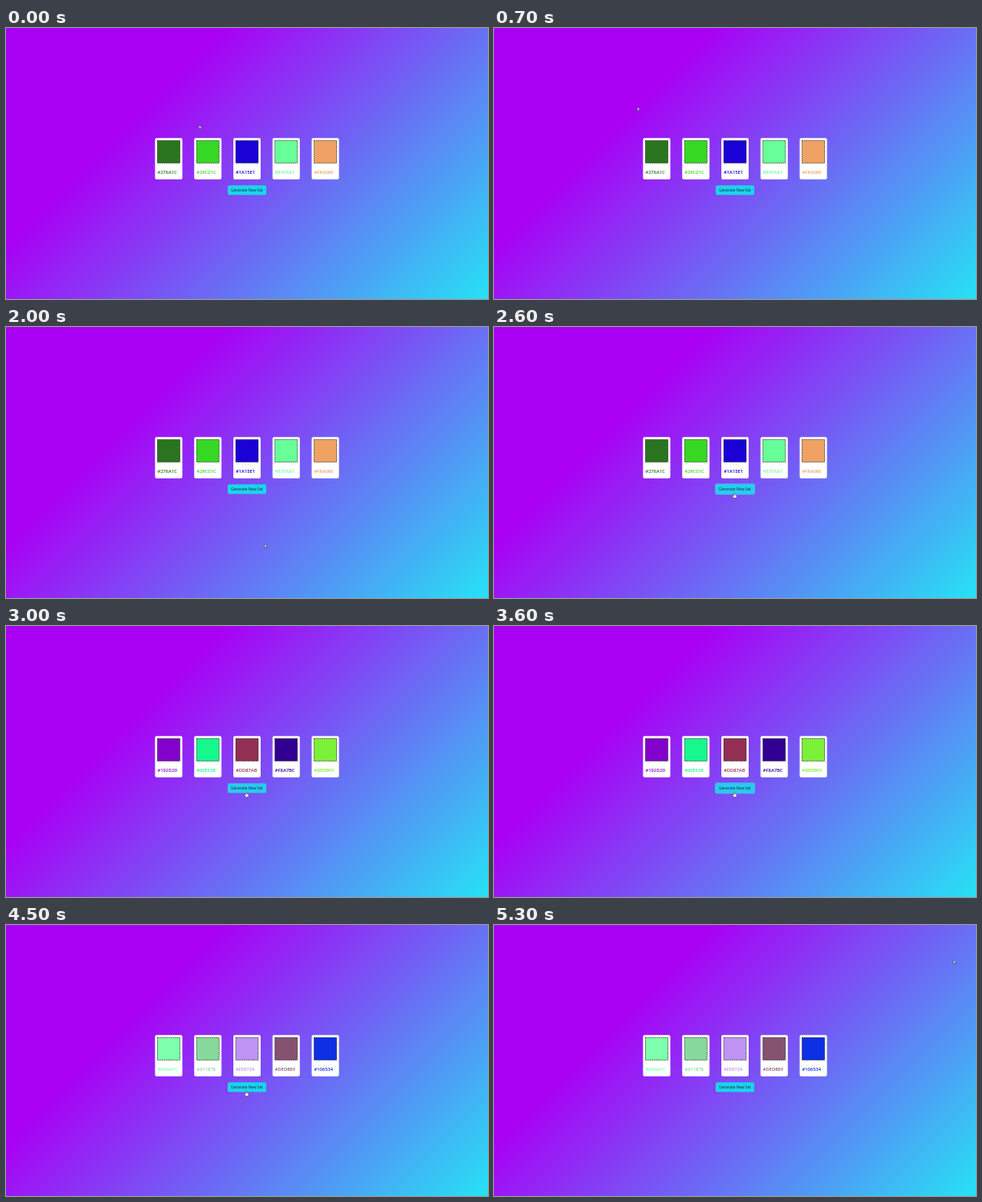
An HTML page that plays this animation: 600 px wide and 338 px high, repeating every 5.4 s.

```html
<!DOCTYPE html>
<html lang="en">
<head>
<meta charset="utf-8">
<title>Colour set generator</title>
<style>
  html, body { margin: 0; width: 100%; height: 100%; overflow: hidden; }
  body { background: linear-gradient(135deg, #a900f4 29%, #28dff4 99%); }
  svg { display: block; width: 600px; height: 338px; font-family: "Open Sans", "Noto Sans", sans-serif; }
  .code { font-size: 5.8px; font-weight: 600; }
  .swatch { stroke: #000; stroke-opacity: .7; stroke-width: .9; stroke-dasharray: 1.6 .8; }
  .label { font-size: 4.75px; fill: #0b2a4a; }

  .set, .ring, .hand, .arrow, .pointer { animation: 5400ms infinite step-end; }
  .set:nth-child(1) { animation-name: first; }
  .set:nth-child(2) { animation-name: second; }
  .set:nth-child(3) { animation-name: third; }
  .ring { animation-name: press; }
  .button { fill: #1dd3ea; animation: hover 5400ms infinite linear; }
  .hand { animation-name: over; }
  .arrow { animation-name: away; }
  .pointer { animation-name: move; animation-timing-function: linear; }

  @keyframes first  { 0% { opacity: 1 } 50%, 100% { opacity: 0 } }
  @keyframes second { 0% { opacity: 0 } 50% { opacity: 1 } 68.5%, 100% { opacity: 0 } }
  @keyframes third  { 0% { opacity: 0 } 68.5%, 100% { opacity: 1 } }
  @keyframes press  { 0% { opacity: 0 } 48.1% { opacity: 1 } 51.8% { opacity: 0 } 64.8% { opacity: 1 } 70.3%, 100% { opacity: 0 } }
  @keyframes over   { 0% { opacity: 0 } 46.2% { opacity: 1 } 85.1%, 100% { opacity: 0 } }
  @keyframes away   { 0% { opacity: 1 } 46.2% { opacity: 0 } 85.1%, 100% { opacity: 1 } }
  @keyframes hover  { 0%, 46.2% { fill: #1dd3ea } 49%, 70% { fill: #2bcaec } 74%, 100% { fill: #1dd3ea } }
  @keyframes move {
    0%     { transform: translate(240.5px, 121px) }
    5.56%  { transform: translate(214px, 114px) }
    11.11%, 12.96% { transform: translate(178.5px, 98.5px) }
    18.52% { transform: translate(147px, 57px) }
    24.07% { transform: translate(215px, 82px) }
    31.48% { transform: translate(325px, 250px) }
    35.19%, 37.04% { transform: translate(322px, 270.5px) }
    44.44% { transform: translate(303px, 225px) }
    46.3%, 84.3% { transform: translate(299px, 207px) }
    88.89% { transform: translate(470px, 90px) }
    92.59% { transform: translate(555px, 52px) }
    96.3%, 100%  { transform: translate(572px, 43.5px) }
  }
</style>
</head>
<body>
<svg viewBox="0 0 600 338">
  <g id="cards" fill="#fff"></g>
  <g id="sets"></g>
  <rect class="ring" x="275" y="195.2" width="50" height="14" rx="2.4" fill="#45b3f5"/>
  <rect class="button" x="276" y="196.2" width="48" height="12" rx="1.6"/>
  <text class="label" x="280" y="203.9">Generate New Set</text>
  <g class="pointer">
    <path class="arrow" d="M0 0V4.8L1.1 3.8L1.9 5.5L2.7 5.1L1.9 3.5H3.3Z" fill="#fff" stroke="#222" stroke-width=".5"/>
    <path class="hand" d="M-.6 .4Q0 -.4 .6 .4V2.2L2.8 2.9Q3.3 3.2 3.1 4.2L2.4 6.3H-.6L-2.3 3.8Q-2.2 3 -1.4 3.3L-.6 4Z" fill="#fff" stroke="#222" stroke-width=".4"/>
  </g>
</svg>
<script>
  const sets = [
    [["#276A1C", "#2a741f"], ["#29C01C", "#36d823"], ["#1A15E1", "#1a02d6"], ["#57EA81", "#67ff98"], ["#F8A060", "#efa263"]],
    [["#192D20", "#8202cb"], ["#00E538", "#16f88e"], ["#DD87AB", "#922f52"], ["#F8A7BC", "#300090"], ["#BB8BF0", "#7cf139"]],
    [["#6D6A7C", "#7dffad"], ["#671878", "#86d99b"], ["#FE6729", "#bf93f4"], ["#DEDBEF", "#85526f"], ["#106534", "#0c2fe3"]]
  ];
  const left = i => 185.5 + i * 48.75;

  const card = (_, i) =>
    `<rect x="${left(i)}" y="137.2" width="34" height="51.6" rx="1.8"/>`;

  const content = ([code, color], i) => `
    <rect class="swatch" x="${left(i) + 3}" y="140.4" width="28" height="28" fill="${color}"/>
    <text class="code" x="${left(i) + 3}" y="182.2" fill="${color}">${code}</text>`;

  document.getElementById("cards").innerHTML = sets[0].map(card).join("");
  document.getElementById("sets").innerHTML =
    sets.map(set => `<g class="set">${set.map(content).join("")}</g>`).join("");
</script>
</body>
</html>
```
